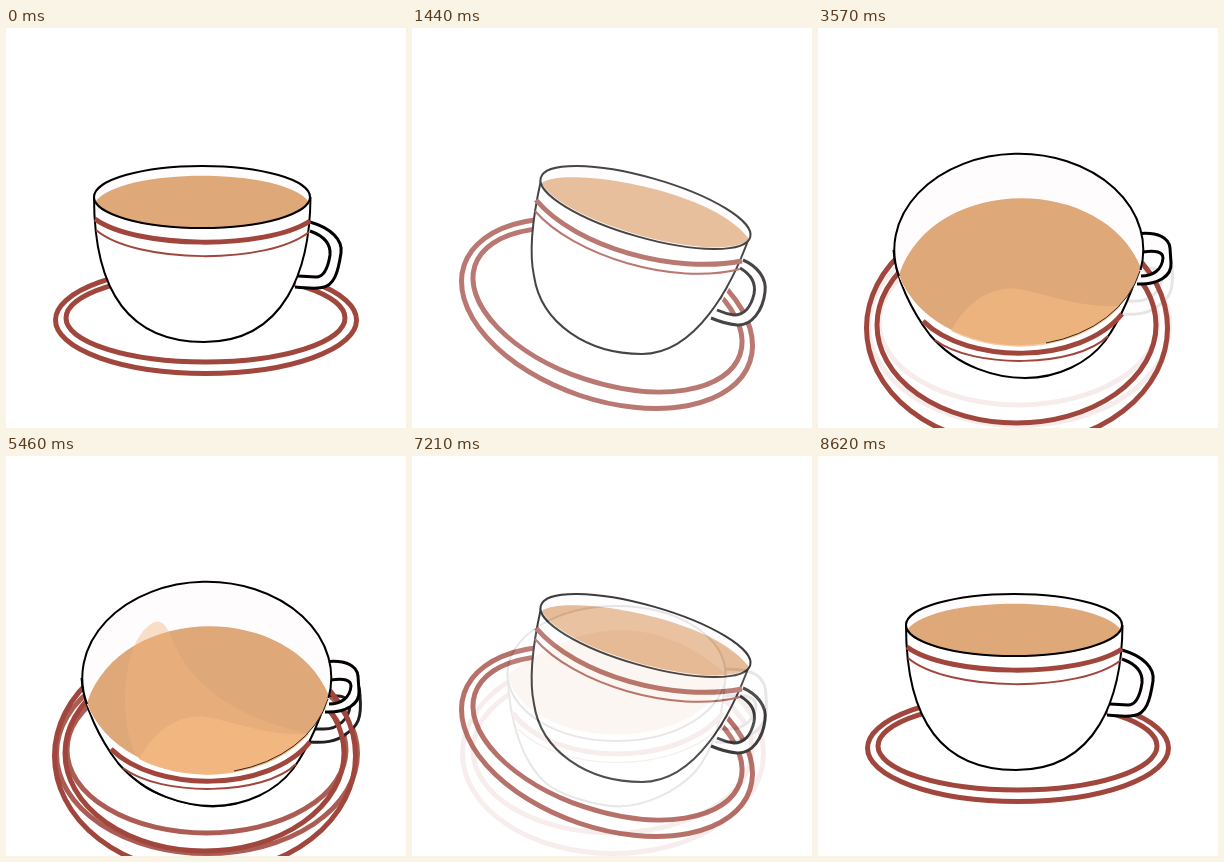
These frames come from a looping animation (400x400 px, 9.75 s). An HTML page:

```html
<!DOCTYPE html>
<html lang="en">
<head>
<meta charset="utf-8">
<title>Cup of tea</title>
<style>
  html, body { margin: 0; width: 100%; height: 100%; overflow: hidden; background: #fff; }
  svg { display: block; width: 100vw; height: 100vh; }
  path, ellipse { fill: none; stroke-linejoin: round; }
  .plate { stroke: #a0463c; stroke-width: 5; }
  .band { stroke: #a0463c; stroke-width: 5; }
  .line { stroke: #a0463c; stroke-width: 2; }
  .body { fill: #fff; stroke: #000; stroke-width: 2; }
  .rim { fill: #fffcfd; }
  .edge { stroke: #000; stroke-width: 2; }
  .tea { fill: #dfa878; }
  .grip { fill: #fffcfd; fill-rule: evenodd; }
  .ear { stroke: #000; stroke-width: 3; }
  .wave { fill: #f2b780; }
</style>
</head>
<body>
<svg id="stage" viewBox="0 0 400 400"></svg>
<script>
const LOOP = 9750;
const stage = document.getElementById('stage');

function add(parent, tag, attrs) {
  const el = document.createElementNS('http://www.w3.org/2000/svg', tag);
  for (const key in attrs) el.setAttribute(key, attrs[key]);
  parent.appendChild(el);
  return el;
}

const path = (g, cls, d, more) => add(g, 'path', { class: cls, d, ...more });

// An oval is [cx, cy, rx, ry, tilt].
const oval = (g, cls, [cx, cy, rx, ry, tilt = 0]) =>
  add(g, 'ellipse', { class: cls, cx, cy, rx, ry, transform: `rotate(${tilt} ${cx} ${cy})` });

// Steps are [time, opacity] pairs; the ends hold.
function fade(el, steps) {
  const all = [[0, steps[0][1]], ...steps, [LOOP, steps[steps.length - 1][1]]];
  el.animate(
    all.map(([t, opacity]) => ({ offset: t / LOOP, opacity })),
    { duration: LOOP, iterations: Infinity }
  );
}

function drawCup(pose) {
  const g = add(stage, 'g', {});
  pose.plates.forEach(p => oval(g, 'plate', p));

  const [outer, inner] = pose.ears;
  path(g, 'grip', `${outer} Z ${inner} Z`);
  path(g, 'ear', outer);
  path(g, 'ear', inner);

  path(g, 'body', pose.body);
  oval(g, 'rim', pose.rim);
  const [, , rx, ry, tilt = 0] = pose.rim;
  path(g, 'tea', `${pose.surface} A${rx} ${ry} ${tilt} 0 1 ${pose.teaStart} Z`);
  const waves = add(g, 'g', {});
  if (pose.edge) {
    path(g, 'edge', pose.edge);
    path(g, 'edge', pose.lip, { style: 'stroke-width:.8' });
  } else {
    oval(g, 'edge', pose.rim);
  }
  path(g, 'band', pose.band);
  path(g, 'line', pose.line, { style: `stroke-width:${pose.thin || 2}` });
  fade(g, pose.fade);
  return waves;
}

const level = {
  plates: [[200, 292, 150.5, 53.5], [199.5, 290, 139.5, 44]],
  ears: [
    'M304 194C325 200 337 212 335 225C332 245 328 258 316 259.5Q308 261 289 259',
    'M304 203C318 208 325 216 324 227C322 240 318 249 310 249L292 248'
  ],
  body: 'M88 169C88 240 108 314 198 314C280 314 304 240 304.5 169',
  rim: [196, 169, 108, 31],
  teaStart: '89 174',
  surface: 'M89 174C115 139 277 139 303 174',
  band: 'M89 191C130 221 260 222 304 193',
  line: 'M90 202C130 236 262 237 303 204',
  fade: [[0, 1], [780, 0], [7500, 0], [8620, 1]]
};

const tilted = {
  plates: [[195, 285.5, 150.8, 86.3, 18.7], [195.5, 282, 139.8, 72.7, 18.5]],
  ears: [
    'M331 232C345 238 355 250 353 264C351 282 340 298 325 297Q313 296 299 290',
    'M328 240C340 247 344 256 342 266C339 279 332 287 322 287Q314 286 305 282'
  ],
  body: 'M129 152C121 188 117 225 122 248C129 295 175 326 230 326C284 326 320 258 338 207',
  rim: [233.5, 179.5, 108.9, 30, 15.9],
  teaStart: '130 155',
  surface: 'M130 155C150 138 300 160 337 211',
  band: 'M124 172C165 220 262 246 330 233',
  line: 'M123 183C162 228 262 258 328 241',
  fade: [[0, 0], [900, 1], [1170, 1], [2160, 0], [6640, 0], [7390, 1], [7500, 1], [8590, 0]]
};

const raised = {
  plates: [[201, 297.5, 150.5, 100], [200.5, 294, 139.5, 83]],
  ears: [
    'M314 213C345 213 354 222 354 240C356 262 352 270 340 278C330 286 318 287 303 286',
    'M313 240C335 238 344 241 344 250C343 262 333 273 318 273L306 273'
  ],
  body: 'M95.5 218C97 260 108 305 135 328C150 340 185 350 207 350.5' +
        'C235 350 265 335 283 316C305 290 312 250 313.5 218',
  rim: [204.5, 217.5, 109, 67.5],
  teaStart: '96 218',
  surface: 'M96 218C175 160 245 160 313 217',
  band: 'M101 257C140 311 268 312 311 257',
  line: 'M106 273C150 318 262 318 308 271',
  thin: 1.2,
  fade: [[1440, 0], [2130, 1], [2200, 1], [2580, 0.63], [3570, 0.1], [4050, 0],
         [4830, 0], [5550, 1], [6640, 1], [7270, 0]]
};

const above = {
  plates: [[199, 300, 150.5, 117], [198.5, 297, 139.5, 98]],
  ears: [
    'M322 205.5C340 204 351 210 352 220L353 235C354 248 340 257 319 256',
    'M325 224C338 222 345 224 345 230C344 242 335 248 323 248'
  ],
  body: 'M75.5 222C77 250 95 285 112 307C140 340 180 350 207 350' +
        'C240 350 270 335 287 313C300 295 318 260 325 222',
  rim: [200.5, 221.5, 124.5, 96],
  teaStart: '81 247',
  surface: 'M81 247C115 146 285 146 323 240',
  edge: 'M81 248A124.5 96 0 1 1 322.5 242',
  lip: 'M322 243A124.5 96 0 0 1 228 315',
  band: 'M105 293C150 337 262 337 304 286',
  line: 'M117 312C155 341 258 340 290 308',
  fade: [[2610, 0], [3330, 1], [5550, 1], [6300, 0]]
};

[level, tilted, raised].forEach(drawCup);
const waves = drawCup(above);

// Splashes share their foot on the front of the rim.
const splash = (crest, steps) =>
  fade(path(waves, 'wave', `M133 303${crest} 303 278A124.5 96 0 0 1 133 303Z`), steps);

splash('C105 250 105 120 135 82C150 68 160 72 168 95C190 190 240 250',
  [[4080, 0], [4530, 1], [4950, 0]]);
splash('C112 275 115 195 140 172C150 162 157 163 164 178C185 235 235 262',
  [[3630, 0], [4170, 1], [5000, 1], [5800, 0]]);
splash('C150 272 175 258 200 261C230 266 260 280',
  [[3180, 0], [3690, 1], [5500, 1], [6000, 0]]);
</script>
</body>
</html>
```
